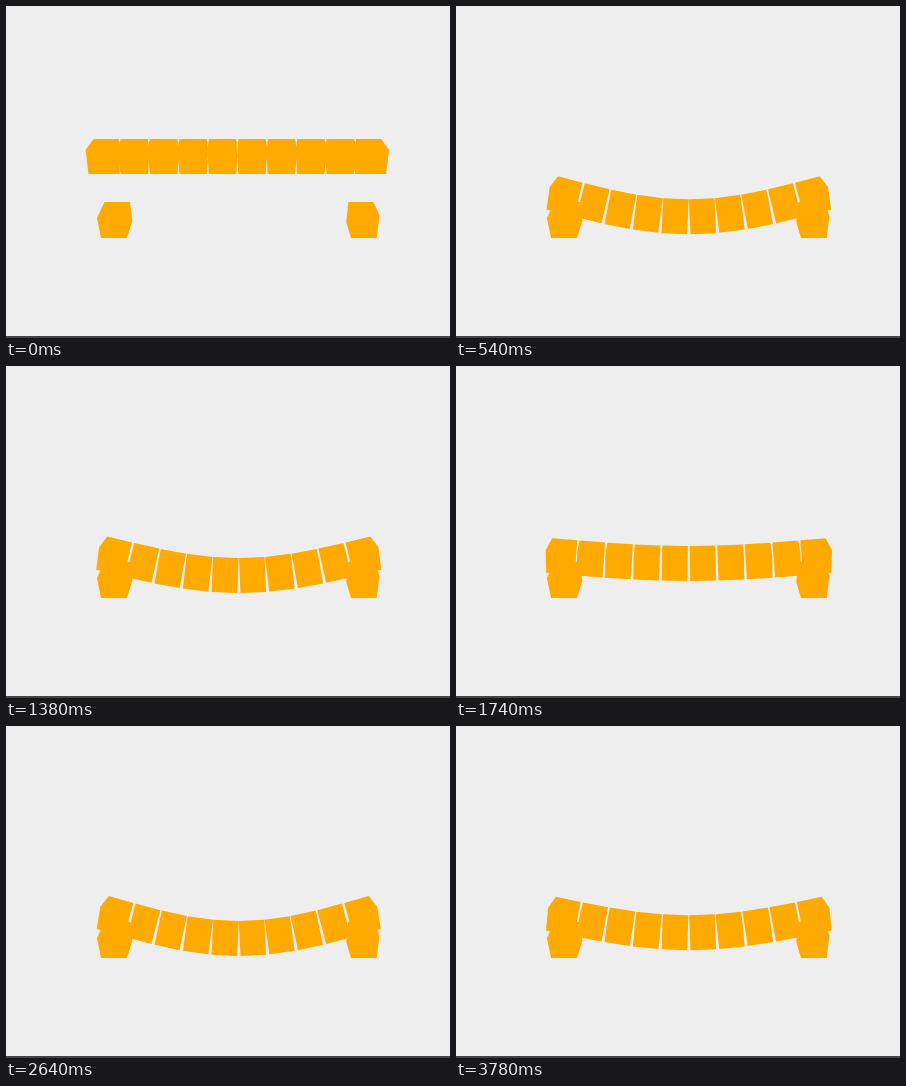
These frames come from a looping animation (444x332 px, 3.84 s). An HTML page with a canvas:

```html
<!DOCTYPE html>
<html>
<head>
<meta charset="utf-8">
<style>
html, body { margin: 0; width: 100%; height: 100%; overflow: hidden; background: #eee; }
canvas { display: block; }
</style>
</head>
<body>
<canvas id="stage" width="444" height="332"></canvas>
<script>
const ctx = document.getElementById('stage').getContext('2d');
const LOOP = 3840, STEP = 60, CONTACT = 416, COUNT = 10;
const REST_Y = 190.7, START_Y = 150.5;

// Turning points of the bridge's middle: time, height
const SWINGS = [[840, 230.5], [1755, 197.3], [2600, 212.3], [3360, 202.5], [4160, 209.8]];

const SUPPORTS = [
  [[98.5, 196], [124, 196], [126.3, 215], [121, 232], [95, 232], [91, 212]],
  [[342.3, 196], [367.5, 196], [373.5, 209.5], [370.7, 232], [345, 232], [340.3, 216]]
];

const mix = (a, b, k) => a + (b - a) * k;

function middleY(t) {
  const [peakTime, peak] = SWINGS[0];
  if (t < CONTACT) return mix(START_Y, REST_Y, (t / CONTACT) ** 2);
  if (t < peakTime) {
    const left = (peakTime - t) / (peakTime - CONTACT);
    return mix(peak, REST_Y, left * left);
  }
  const i = SWINGS.findIndex(s => t < s[0]);
  const [t0, y0] = SWINGS[i - 1], [t1, y1] = SWINGS[i];
  return mix(y0, y1, (1 - Math.cos(Math.PI * (t - t0) / (t1 - t0))) / 2);
}

function polygon(points) {
  ctx.beginPath();
  points.forEach(([x, y]) => ctx.lineTo(x, y));
  ctx.closePath();
  ctx.fill();
}

function drawBlock(i, pose) {
  const { centerX, endY, sag, spacing, half, loose } = pose;
  const phase = Math.PI * i / (COUNT - 1);
  const amp = sag / Math.sin(Math.PI * 4 / 9);
  const offset = i - (COUNT - 1) / 2;
  const side = Math.sign(offset);
  const u = Math.abs(offset) / 4.5;
  const isEnd = i === 0 || i === COUNT - 1;
  const slope = amp * Math.cos(phase) * Math.PI / (COUNT - 1) / spacing;
  const bulge = isEnd ? 18 + loose * 1.4
    : half + u * 3 * Math.max(0, 1 - sag / 22) + loose * 1.5;

  ctx.save();
  ctx.translate(centerX + offset * spacing, endY + amp * Math.sin(phase));
  ctx.rotate(Math.atan(slope));
  ctx.scale(side, 1);
  polygon([
    [-half, -17.5],
    [isEnd ? 12.6 - loose * 1.2 : half, -17.5],
    [bulge, -5 - loose * 1.5],
    [isEnd ? 15.5 + loose : half, 17.5],
    [-half - (isEnd ? 1 : 0), 17.5],
    [-half - loose, -1]
  ]);
  ctx.restore();
}

function draw(t) {
  const y = middleY(t);
  const falling = t < CONTACT;
  const loose = falling ? 1 - t / CONTACT : 0;
  const sag = falling ? 0 : y - REST_Y;
  const pose = {
    sag, loose,
    centerX: 232.8 - loose * 1.5,
    endY: falling ? y : REST_Y - 0.0008 * sag * sag,
    spacing: 28 + loose * 1.4 - 0.0017 * sag * sag,
    half: 12.8 + loose * 0.9
  };
  ctx.fillStyle = '#eee';
  ctx.fillRect(0, 0, 444, 332);
  ctx.fillStyle = '#444';
  ctx.fillRect(0, 330, 444, 2);
  ctx.fillStyle = '#fa0';
  SUPPORTS.forEach(polygon);
  for (let i = 0; i < COUNT; i++) drawBlock(i, pose);
}

const start = performance.now();
function frame() {
  const t = (performance.now() - start) % LOOP;
  draw(Math.floor(t / STEP) * STEP);
  requestAnimationFrame(frame);
}
frame();
</script>
</body>
</html>
```
